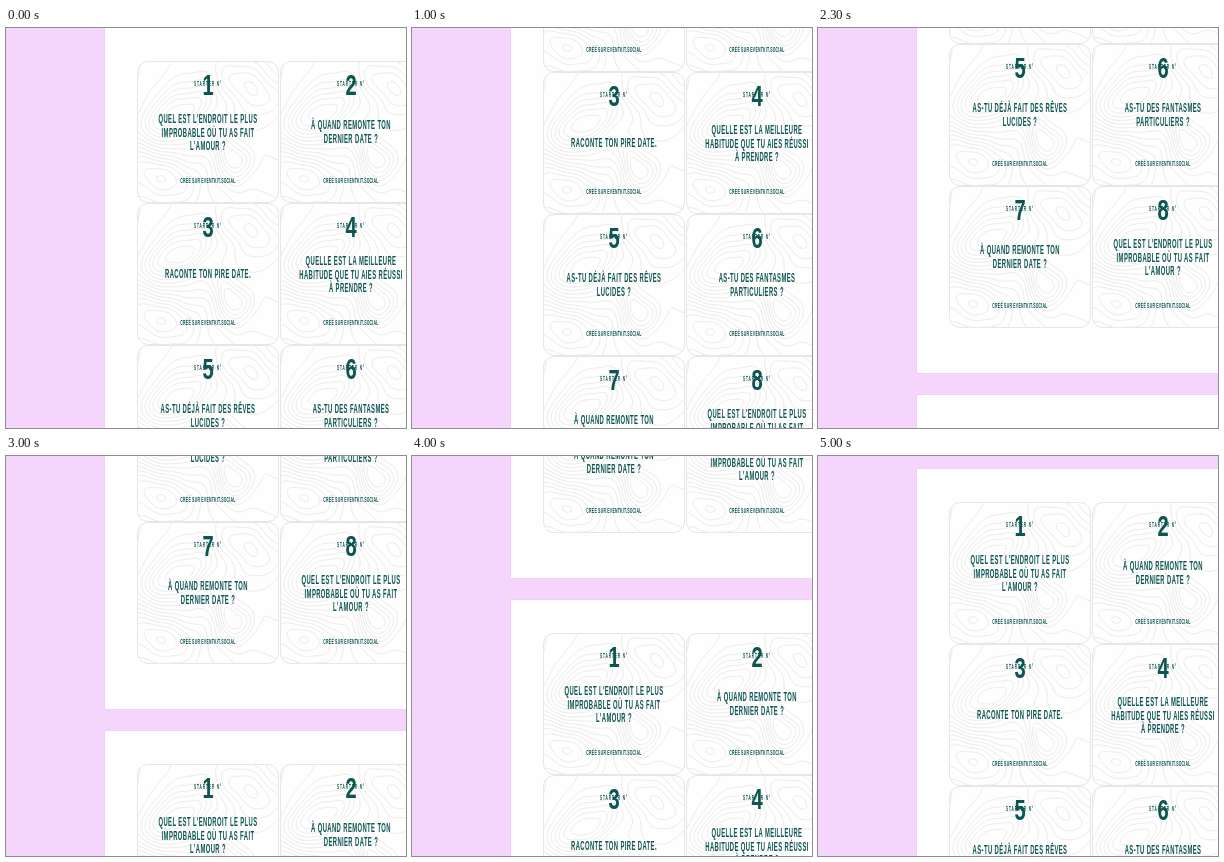
These frames come from a looping animation (400x400 px, 5.1 s). An HTML page:

```html
<!DOCTYPE html>
<html lang="fr">
<head>
<meta charset="utf-8">
<title>Starters</title>
<style>
  html, body { margin: 0; width: 100%; height: 100%; overflow: hidden; background: #f6d5fd; }
  #stage { position: relative; width: 400px; height: 400px; overflow: hidden; background: #f6d5fd; }
  #strip { position: absolute; inset: 0; will-change: transform; }
  .page {
    position: absolute; left: 99px; width: 349px; height: 646px;
    background: #fefefe; box-shadow: 0 0 1px rgba(60, 30, 70, .15);
  }
  .card {
    position: absolute; box-sizing: border-box; width: 142px; height: 142px;
    border: 1px solid #e6e6e6; border-radius: 11px; background: #fefefe;
    color: #0c5551; text-align: center;
    font: bold 12.2px/13.6px "Liberation Sans", Arial, sans-serif;
  }
  .card svg { position: absolute; left: -1px; top: -1px; width: 142px; height: 142px; border-radius: 11px; overflow: hidden; }
  .card div {
    --k: .48;
    position: absolute; left: 50%; white-space: pre; letter-spacing: .07em;
    transform: translate(-50%, -50%) scaleX(var(--k));
  }
  .card .label { top: 22px; font-size: 6.6px; letter-spacing: .28em; }
  .card .num { --k: .67; top: 22.7px; font-size: 30px; line-height: 30px; letter-spacing: 0; }
  .card .ask { top: 71.3px; }
  .card .foot { top: 119px; font-size: 7.2px; }
</style>
</head>
<body>
<div id="stage"><div id="strip"></div></div>
<svg width="0" height="0" style="position:absolute">
  <symbol id="topo" viewBox="0 0 142 142">
    <path id="lines" fill="none" stroke="#ebebeb" stroke-width=".7" stroke-linecap="round"/>
  </symbol>
</svg>
<script>
const SIZE = 142, PERIOD = 668, STEPS = 51, STEP_MS = 100;

const love = "QUEL EST L'ENDROIT LE PLUS\nIMPROBABLE OÙ TU AS FAIT\nL'AMOUR ?";
const last = "À QUAND REMONTE TON\nDERNIER DATE ?";
const asks = [
  love,
  last,
  "RACONTE TON PIRE DATE.",
  "QUELLE EST LA MEILLEURE\nHABITUDE QUE TU AIES RÉUSSI\nÀ PRENDRE ?",
  "AS-TU DÉJÀ FAIT DES RÊVES\nLUCIDES ?",
  "AS-TU DES FANTASMES\nPARTICULIERS ?",
  last,
  love
];

// Hills: x, y, long radius, short radius, tilt, height
const hills = [
  [38, 52, 42, 25, -.5, 1],
  [93, 96, 24, 17, 1.3, .75],
  [114, 24, 38, 25, .6, -.6],
  [28, 116, 36, 19, .25, -.6]
];

function height(x, y) {
  const wx = x + 3 * Math.sin(y / 9) + 2 * Math.sin(x / 7 + y / 13);
  const wy = y + 3 * Math.sin(x / 11 + 1) + 1.5 * Math.cos(x / 6);
  return hills.reduce((sum, [cx, cy, a, b, tilt, h]) => {
    const dx = wx - cx, dy = wy - cy, c = Math.cos(tilt), s = Math.sin(tilt);
    const u = (dx * c + dy * s) / a, v = (dy * c - dx * s) / b;
    return sum + h * Math.exp(-u * u - v * v);
  }, (wx - wy) / 300);
}

// Contour segments by splitting each grid cell into two triangles
function contours(cell, gap) {
  let d = "";
  const n = Math.ceil(SIZE / cell);
  const point = (i, j) => [i * cell, j * cell, height(i * cell, j * cell)];
  const grid = Array.from({ length: n + 1 }, (_, j) =>
    Array.from({ length: n + 1 }, (_, i) => point(i, j)));

  function slice(tri) {
    const z = tri.map(p => p[2]);
    const top = Math.max(...z);
    for (let k = Math.ceil(Math.min(...z) / gap); k * gap < top; k++) {
      const cuts = [];
      tri.forEach((p, i) => {
        const q = tri[(i + 1) % 3], level = k * gap;
        if ((p[2] > level) === (q[2] > level)) return;
        const f = (level - p[2]) / (q[2] - p[2]);
        cuts.push((p[0] + f * (q[0] - p[0])).toFixed(2) + " " + (p[1] + f * (q[1] - p[1])).toFixed(2));
      });
      if (cuts.length === 2) d += "M" + cuts[0] + "L" + cuts[1];
    }
  }

  for (let j = 0; j < n; j++) {
    for (let i = 0; i < n; i++) {
      const a = grid[j][i], b = grid[j][i + 1], c = grid[j + 1][i], e = grid[j + 1][i + 1];
      slice([a, b, c]);
      slice([b, e, c]);
    }
  }
  return d;
}

const card = (ask, i) => `
  <div class="card" style="left:${32 + (i % 2) * 142.5}px;top:${33 + (i >> 1) * SIZE}px">
    <svg><use href="#topo"/></svg>
    <div class="label">STARTER N°</div>
    <div class="num">${i + 1}</div>
    <div class="ask">${ask}</div>
    <div class="foot">CRÉÉ SUR EVENTKIT.SOCIAL</div>
  </div>`.replace('<div class="card"', '<article class="card"').replace(/<\/div>$/, "</article>");

const page = top => `<section class="page" style="top:${top}px">${asks.map(card).join("")}</section>`;

document.getElementById("lines").setAttribute("d", contours(2, .125));
const strip = document.getElementById("strip");
strip.innerHTML = page(0) + page(PERIOD);

// Steady scroll in whole-pixel steps
const frames = Array.from({ length: STEPS + 1 }, (_, i) => ({
  offset: i / STEPS,
  transform: `translateY(${-Math.round(i * PERIOD / STEPS)}px)`,
  easing: "steps(1, end)"
}));
strip.animate(frames, { duration: STEPS * STEP_MS, iterations: Infinity });
</script>
</body>
</html>
```
